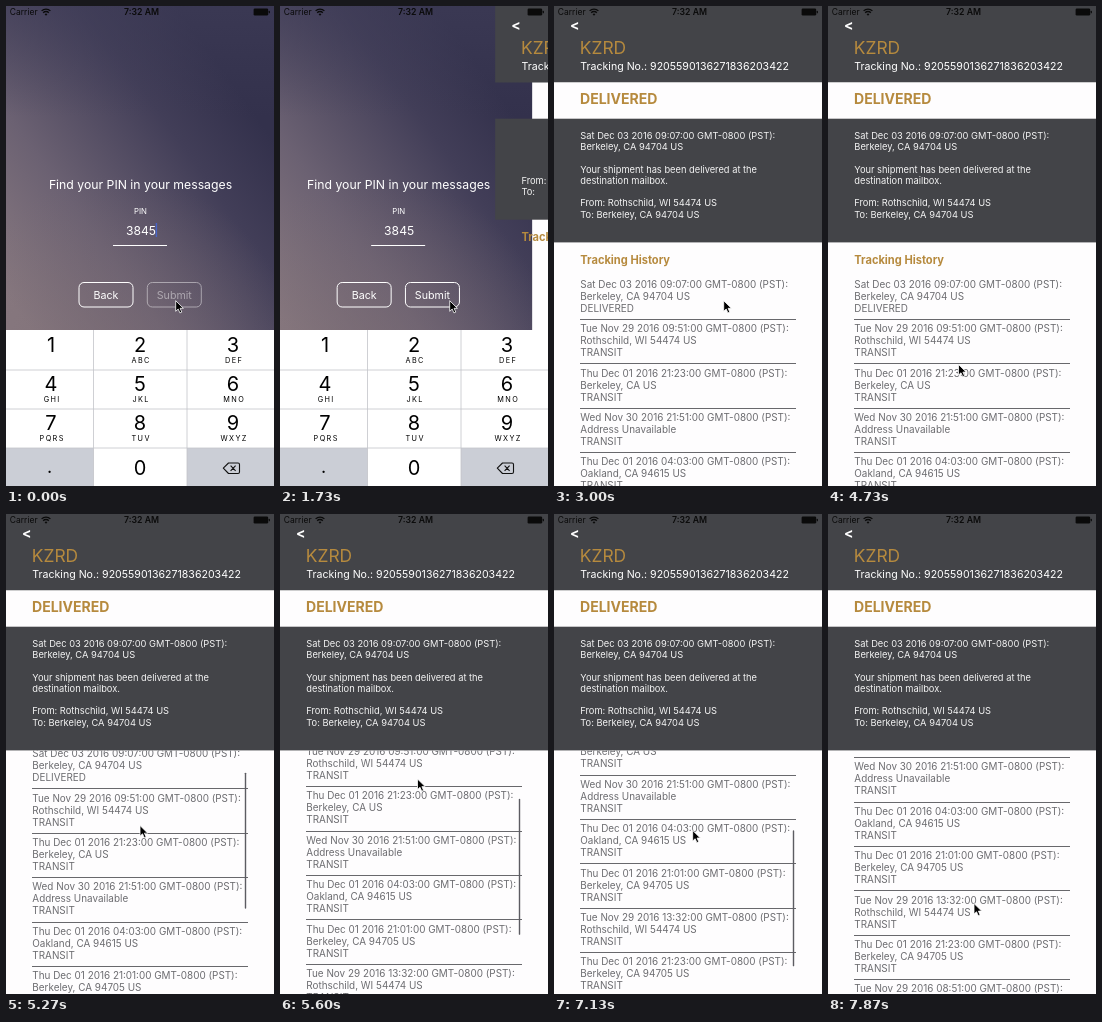
An HTML page that plays this animation: 268x480 px, repeating every 8000 ms.

```html
<!DOCTYPE html>
<html lang="en">
<head>
<meta charset="utf-8">
<title>Parcel tracking</title>
<style>
  html, body { margin: 0; width: 100%; height: 100%; overflow: hidden; background: #fff; }
  svg { display: block; width: 100%; height: 100%; font-family: Inter, Roboto, sans-serif; }
  text { white-space: pre; }
</style>
</head>
<body>
<svg id="stage" viewBox="0 0 268 480" preserveAspectRatio="none"></svg>
<script>
const LOOP = 8000, W = 268, ROW = 44.4;
const HEAD_END = 76.5, INFO_TOP = 112.7, LIST_TOP = 236.4;
const GOLD = '#b68a3e', DARK = '#434448', PAPER = '#fefdfe';

const text = (x, y, size, str, fill = '#fff', extra = '') =>
  `<text x="${x}" y="${y}" font-size="${size}" fill="${fill}" ${extra}>${str}</text>`;
const middle = (x, y, size, str, fill, extra = '') =>
  text(x, y, size, str, fill, 'text-anchor="middle" ' + extra);
const rect = (x, y, w, h, fill, extra = '') =>
  `<rect x="${x}" y="${y}" width="${w}" height="${h}" fill="${fill}" ${extra}/>`;
const line = (d, stroke, width = 1) =>
  `<path d="${d}" fill="none" stroke="${stroke}" stroke-width="${width}"/>`;

// PIN page
const button = (x, label) =>
  rect(x, 276.5, 54, 24.5, 'none', 'rx="5" stroke="#fff"') +
  middle(x + 27, 293.1, 10.7, label);

const pinPage =
  rect(0, 0, W, 480, 'url(#dusk)') + rect(0, 0, W, 480, 'url(#glow)') +
  rect(0, 0, W, 110, 'url(#shade)') +
  middle(134.5, 183.3, 12.25, 'Find your PIN in your messages') +
  middle(134.5, 208.3, 7.8, 'PIN') +
  middle(135, 228.9, 12.15, '3845') +
  rect(107, 239, 54, 1, '#fff') +
  rect(149.7, 217, 1.4, 14, '#4468d8', 'id="caret"') +
  button(73, 'Back') + `<g id="submit">${button(141.3, 'Submit')}</g>`;

// Number pad
const letters = ['', 'ABC', 'DEF', 'GHI', 'JKL', 'MNO', 'PQRS', 'TUV', 'WXYZ'];
const columns = [45, 134, 227];
const keys = letters.map((abc, i) => {
  const x = columns[i % 3], y = 346 + 39 * Math.floor(i / 3);
  return middle(x, y, 20, i + 1, '#000') +
    middle(x + 1.2, y + 10.8, 7.3, abc, '#000', 'letter-spacing="1.4"');
}).join('');

const keypad =
  rect(0, 324, W, 156, '#fff') +
  rect(0, 442, 87.5, 38, '#cbced6') + rect(181, 442, 87, 38, '#cbced6') +
  line('M0 364H268M0 403H268M0 442H268M87.5 324V480M181 324V480', '#c3c5ca', .8) +
  keys + middle(134, 468.6, 20, '0', '#000') + middle(43.5, 467, 18, '.', '#000') +
  '<path d="M222.5 457H232q1.5 0 1.5 1.5V466q0 1.5-1.5 1.5H222.5L217.3 462.2Z' +
  'M224.6 459.6l5 5.2M229.6 459.6l-5 5.2" fill="none" stroke="#111" stroke-width="1.1" stroke-linejoin="round"/>';

// Tracking page
const stamp = (day, time) => `${day} ${time}:00 GMT-0800 (PST):`;
const history = [
  ['Sat Dec 03 2016', '09:07', 'Berkeley, CA 94704 US', 'DELIVERED'],
  ['Tue Nov 29 2016', '09:51', 'Rothschild, WI 54474 US'],
  ['Thu Dec 01 2016', '21:23', 'Berkeley, CA US'],
  ['Wed Nov 30 2016', '21:51', 'Address Unavailable'],
  ['Thu Dec 01 2016', '04:03', 'Oakland, CA 94615 US'],
  ['Thu Dec 01 2016', '21:01', 'Berkeley, CA 94705 US'],
  ['Tue Nov 29 2016', '13:32', 'Rothschild, WI 54474 US'],
  ['Thu Dec 01 2016', '21:23', 'Berkeley, CA 94705 US'],
  ['Tue Nov 29 2016', '08:51', 'Rothschild, WI 54474 US']
];
const rows = history.map(([day, time, place, status = 'TRANSIT'], i) => {
  const y = 281.7 + ROW * i;
  return [stamp(day, time), place, status]
    .map((str, n) => text(26.3, y + 12 * n, 9.91, str, '#6c6c70')).join('') +
    rect(26, y + 31.2, 216, 1, '#68686c', 'shape-rendering="crispEdges"');
}).join('');

const detail = (lines, y) => lines
  .map((str, i) => text(26.3, y + 11.27 * i, 9.3, str, '#f4f4f4')).join('');
const heading = y => text(26.3, y, 11.1, 'Tracking History', GOLD, 'font-weight="700"');

const loading = rect(0, INFO_TOP, W, 101, DARK) + detail(['From: ', 'To: '], 178) + heading(235.4);
const loaded =
  rect(0, HEAD_END, W, 480 - HEAD_END, PAPER) +
  text(94.5, 63.6, 10.6, '9205590136271836203422', '#fff', 'id="number"') +
  text(26, 98.2, 14.05, 'DELIVERED', GOLD, 'font-weight="700"') +
  rect(0, INFO_TOP, W, LIST_TOP - INFO_TOP, DARK) +
  detail([stamp('Sat Dec 03 2016', '09:07'), 'Berkeley, CA 94704 US', '',
    'Your shipment has been delivered at the', 'destination mailbox.', '',
    'From: Rothschild, WI 54474 US', 'To: Berkeley, CA 94704 US'], 132.7) +
  `<g clip-path="url(#listClip)"><g id="list">${heading(258.1)}${rows}</g>` +
  rect(238.8, LIST_TOP + .6, 1.4, 136, '#5c5c62', 'rx=".7" id="bar"') + '</g>';

const trackPage =
  rect(0, 0, W, HEAD_END, DARK) +
  text(16, 23.8, 14, '&lt;', '#fff', 'font-weight="700"') +
  text(25.8, 48.4, 17.4, 'KZRD', GOLD) +
  text(26.3, 63.6, 10.6, 'Tracking No.: ', '#fff', 'id="label"') +
  `<g id="loading">${loading}</g><g id="loaded">${loaded}</g>`;

const statusBar =
  text(3.8, 9.2, 8.5, 'Carrier', '#0a0a0a') +
  middle(135.5, 9.2, 8.7, '7:32 AM', '#0a0a0a', 'font-weight="600"') +
  line('M35.6 4.9A6.2 6.2 0 0 1 44.4 4.9M37.2 6.7A3.9 3.9 0 0 1 42.8 6.7', '#0a0a0a', 1.3) +
  '<path d="M38.6 8.2A2 2 0 0 1 41.4 8.2L40 9.7Z" fill="#0a0a0a"/>' +
  rect(247.6, 2.4, 14.6, 7.2, '#0a0a0a', 'rx="1.4"') + rect(262.7, 4.7, 1.2, 2.6, '#0a0a0a', 'rx=".6"');

const pointer =
  '<path d="M0 0V10.6L2.5 8.3L4.2 12.2L6.1 11.4L4.4 7.6H7.7Z" fill="#000" stroke="#fff" stroke-width=".8" stroke-linejoin="round"/>';

document.getElementById('stage').innerHTML = `
  <defs>
    <linearGradient id="dusk" gradientUnits="userSpaceOnUse" x1="0" y1="290" x2="250" y2="110">
      <stop offset="0" stop-color="#887980"/><stop offset=".35" stop-color="#6b6172"/>
      <stop offset=".75" stop-color="#423e58"/><stop offset="1" stop-color="#33314c"/>
    </linearGradient>
    <radialGradient id="glow" gradientUnits="userSpaceOnUse" cx="110" cy="350" r="180">
      <stop offset="0" stop-color="#7a6b72" stop-opacity=".55"/><stop offset="1" stop-color="#7a6b72" stop-opacity="0"/>
    </radialGradient>
    <linearGradient id="shade" x1="0" y1="0" x2="0" y2="1">
      <stop offset="0" stop-color="#3f3d58" stop-opacity=".6"/><stop offset="1" stop-color="#3f3d58" stop-opacity="0"/>
    </linearGradient>
    <clipPath id="listClip">${rect(0, LIST_TOP, W, 480 - LIST_TOP, '#000')}</clipPath>
  </defs>
  ${rect(0, 0, W, 480, PAPER)}
  <g id="pin">${pinPage}</g><g id="track">${trackPage}</g>
  <g id="keypad">${keypad}</g>${statusBar}<g id="cursor">${pointer}</g>`;

const $ = id => document.getElementById(id);
const move = (id, x, y) => $(id).setAttribute('transform', `translate(${x.toFixed(2)} ${y.toFixed(2)})`);
const show = (id, alpha) => $(id).setAttribute('opacity', +alpha);

// The number follows directly after its label.
function placeNumber() {
  $('number').setAttribute('x', 26.3 + $('label').getComputedTextLength());
}
placeNumber();
document.fonts.ready.then(placeNumber);

const ramp = (t, a, b) => Math.min(1, Math.max(0, (t - a) / (b - a)));
const smooth = p => p * p * (3 - 2 * p);
const easeOut = p => 1 - (1 - p) ** 3;

// Overdamped spring of the page push
function spring(ms) {
  const s = Math.max(0, ms) / 1000, slow = 12.1, fast = 66.9;
  return 1 - (fast * Math.exp(-slow * s) - slow * Math.exp(-fast * s)) / (fast - slow);
}

// Pointer stops: start, end, x, y
const stops = [
  [3220, 3670, 253, 245], [3950, 4730, 130.5, 358.5], [4940, 5600, 137.5, 265],
  [5820, 6430, 137.5, 363], [6680, 7330, 139, 303], [7540, 7870, 146, 389.5]
];
function pointerAt(t) {
  let x = 169.7, y = 294.7;
  for (const [a, b, nx, ny] of stops) {
    const p = smooth(ramp(t, a, b));
    x += (nx - x) * p;
    y += (ny - y) * p;
  }
  return [x, y];
}

// Dragging starts after a short slop and coasts on release.
function scrollAt(t) {
  const y = pointerAt(t)[1];
  if (t < 4940) return 0;
  if (t < 5600) return Math.max(0, 350 - y);
  if (t < 6680) return 85 + 16.5 * easeOut(ramp(t, 5600, 6300));
  if (t < 7330) return 101.5 + Math.max(0, 356 - y);
  return 154.5 + 4 * easeOut(ramp(t, 7330, 7560));
}

function draw(t) {
  const push = spring(t - 1699);
  const done = t >= 2284, ready = t >= 2530;
  move('pin', -.3 * W * push, 0);
  show('pin', !done);
  move('track', done ? 0 : W * (1 - push), 0);
  show('loading', !ready);
  show('loaded', ready);
  move('keypad', 0, 156 * easeOut(ramp(t, 1760, 2160)));

  const caret = 1 - ramp(t, 220, 470) + ramp(t, 780, 1070) - ramp(t, 1220, 1470);
  show('caret', caret * .85);
  show('submit', t < 1670 ? .45 : 1);

  const scroll = scrollAt(t);
  move('list', 0, -scroll);
  move('bar', 0, scroll * .5625);
  show('bar', ramp(t, 4960, 5030) - ramp(t, 6260, 6500) +
    ramp(t, 6700, 6770) - ramp(t, 7590, 7850));
  move('cursor', ...pointerAt(t));
}

const start = performance.now();
function tick() {
  draw((performance.now() - start) % LOOP);
  requestAnimationFrame(tick);
}
tick();
</script>
</body>
</html>
```
